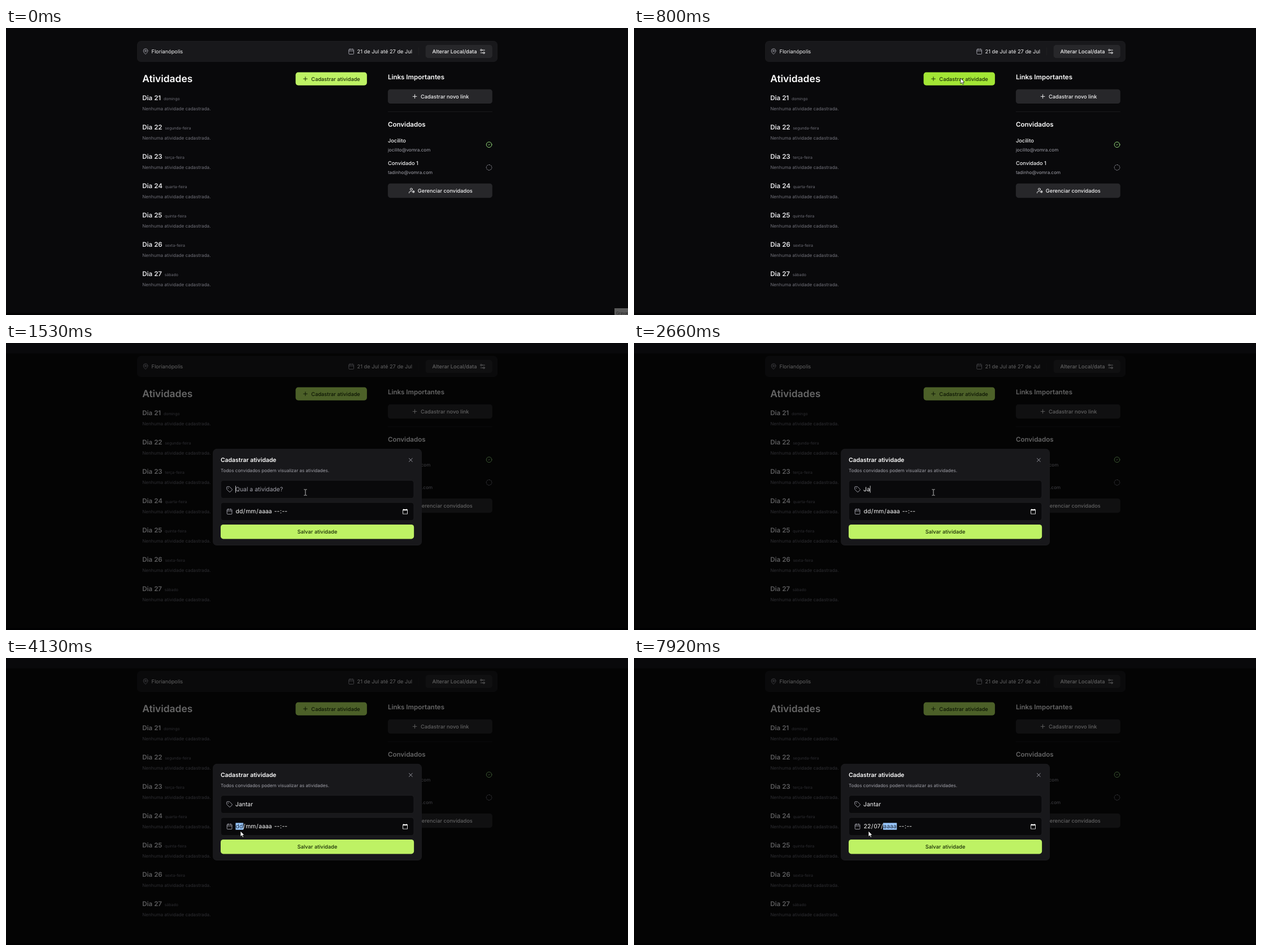
Recreate the animation shown at these times as an HTML page. Size 1101x509 px, loop 8000 ms.

```html
<!DOCTYPE html>
<html lang="pt-BR">
<head>
<meta charset="utf-8">
<title>Atividades</title>
<style>
  html, body { margin: 0; width: 100%; height: 100%; overflow: hidden; background: #09090b; }
  svg { display: block; width: 1101px; height: 509px; }
  text, .date {
    font-family: Inter, "Open Sans", sans-serif;
    font-optical-sizing: none;
    text-rendering: geometricPrecision;
    white-space: pre;
  }
  .icon { fill: none; stroke-width: 2; stroke-linecap: round; stroke-linejoin: round; }
  .date { font-size: 18px; line-height: 56px; color: #fafafa; }
  .date span { padding: 0 1px; }
  .date .on { background: #99c8ff; color: #1d2733; }
</style>
</head>
<body>
<svg viewBox="0 0 1101 509">
  <g id="ui" transform="translate(.5 0) scale(.578)"></g>
  <g id="tip">
    <rect x="1077" y="497" width="24" height="12" fill="#5a5a5a"/>
    <text x="1080" y="507.5" font-size="7" fill="#1c1c1c" style="font-family:'Open Sans',sans-serif">Gravado</text>
  </g>
  <g id="pointer">
    <path id="arrow" transform="scale(.578)" fill="#fff" stroke="#000" stroke-width="1.2"
      d="M0 0V17L4 13.3 6.8 19.5 9.6 18.2 6.9 12.2H12.2Z"/>
    <path id="beam" transform="scale(.578)" fill="none" stroke="#d8d8d8" stroke-width="1.5"
      d="M-4.5-9H-1L0-8 1-9H4.5M0-8V8M-4.5 9H-1L0 8 1 9H4.5"/>
  </g>
</svg>
<script>
const LOOP = 8000, FRAME = 1000 / 15;
const $ = id => document.getElementById(id);
const WHITE = '#fff', SOFT = '#f4f4f5', LIGHT = '#e4e4e7', GRAY = '#a1a1aa', DIM = '#71717a',
  PANEL = '#18181b', BUTTON = '#27272a', LIME = '#bef264', HOVER = '#a3e635', INK = '#1a2e05';

const icons = {
  pin: '<path d="M20 10c0 6-8 12-8 12s-8-6-8-12a8 8 0 0 1 16 0Z"/><circle cx="12" cy="10" r="3"/>',
  calendar: '<rect x="3" y="4" width="18" height="18" rx="2"/><path d="M8 2v4M16 2v4M3 10h18"/>',
  sliders: '<path d="M20 7h-9M14 17H5"/><circle cx="17" cy="17" r="3"/><circle cx="7" cy="7" r="3"/>',
  plus: '<path d="M5 12h14M12 5v14"/>',
  check: '<circle cx="12" cy="12" r="10"/><path d="m9 12 2 2 4-4"/>',
  pending: '<circle cx="12" cy="12" r="10" stroke-dasharray="4.1 3.754" stroke-dashoffset="2.05"/>',
  manage: '<circle cx="10" cy="7" r="4"/><path d="M2 21v-2a4 4 0 0 1 4-4h5M18 12v1.5M18 18.5V20M21.5 14l-1.3.8M15.8 17.2l-1.3.8M21.5 18l-1.3-.8M15.8 14.8l-1.3-.8"/><circle cx="18" cy="16" r="2.5"/>',
  tag: '<path d="M12.6 2.6A2 2 0 0 0 11.2 2H4a2 2 0 0 0-2 2v7.2a2 2 0 0 0 .6 1.4l8.7 8.7a2.4 2.4 0 0 0 3.4 0l6.6-6.6a2.4 2.4 0 0 0 0-3.4Z"/><circle cx="7.5" cy="7.5" r=".6"/>',
  close: '<path d="M18 6 6 18M6 6l12 12"/>'
};

// y is the middle of the line for text and icons
const icon = (name, x, y, color = GRAY) =>
  `<g class="icon" stroke="${color}" transform="translate(${x} ${y - 10}) scale(${20 / 24})">${icons[name]}</g>`;
const text = (s, x, y, size = 16, weight = 400, fill = SOFT, extra = '') =>
  `<text x="${x}" y="${y + size * .364}" font-size="${size}" font-weight="${weight}" fill="${fill}" ${extra}>${s}</text>`;
const box = (x, y, w, h, r, fill, extra = '') =>
  `<rect x="${x}" y="${y}" width="${w}" height="${h}" rx="${r}" fill="${fill}" ${extra}/>`;

const L = 416.5, R = 1168.5, M = 656.5;

const header = box(400.5, 40, 1104, 64, 12, PANEL) +
  box(401, 40.5, 1103, 63, 11.5, 'none', 'stroke="#fff" stroke-opacity=".035"') +
  icon('pin', L, 72) + text('Florianópolis', 444.5, 72) +
  icon('calendar', 1046.5, 72) + text('21 de Jul até 27 de Jul', 1074.5, 72) +
  box(1263, 60, 1, 24, 0, BUTTON) + box(1284, 52, 204.5, 40, 8, BUTTON) +
  text('Alterar Local/data', 1304.5, 72, 16, 500) + icon('sliders', 1448.5, 72, SOFT);

const days = ['domingo', 'segunda-feira', 'terça-feira', 'quarta-feira', 'quinta-feira', 'sexta-feira', 'sábado']
  .map((name, i) => {
    const y = 214 + 90 * i;
    const label = `<tspan dx="8" font-size="12" font-weight="400" fill="${DIM}">${name}</tspan>`;
    return text(`Dia ${21 + i}${label}`, L, y, 20, 600, LIGHT) +
      text('Nenhuma atividade cadastrada.', L, y + 34, 14, 400, DIM);
  }).join('');

const guest = (name, mail, y, mark, color) =>
  text(name, R, y, 16, 500) + text(mail, R, y + 28, 14, 400, GRAY) + icon(mark, 1468.5, y + 13, color);

const page = header +
  text('Atividades', L, 156, 30, 600, WHITE) +
  box(886, 136, 218.5, 40, 8, LIME, 'id="add"') +
  icon('plus', 906, 156, INK) + text('Cadastrar atividade', 934, 156, 16, 500, INK) + days +
  text('Links Importantes', R, 150, 20, 600, WHITE) +
  box(R, 188, 320, 44, 8, BUTTON) + icon('plus', 1241, 210, SOFT) +
  text('Cadastrar novo link', 1269, 210, 16, 500) +
  box(R, 256, 320, 1, 0, BUTTON) +
  text('Convidados', R, 295, 20, 600, WHITE) +
  guest('Jocilito', 'jocilito@vomra.com', 345, 'check', '#9be27f') +
  guest('Convidado 1', 'tadinho@vomra.com', 415, 'pending', GRAY) +
  box(R, 477, 320, 44, 8, BUTTON) + icon('manage', 1232, 499, SOFT) +
  text('Gerenciar convidados', 1260, 499, 16, 500) +
  box(-2, 874, 1910, 8, 0, '#030304');

const field = y => box(M + .5, y + .5, 591, 55, 7.5, '#09090b', `stroke="${BUTTON}"`);

const modal = `<g id="modal">` +
  box(-2, 32, 1910, 860, 0, '#000', 'fill-opacity=".6"') +
  box(632.5, 325, 640, 296, 12, PANEL) +
  box(633, 325.5, 639, 295, 11.5, 'none', 'stroke="#fff" stroke-opacity=".035"') +
  text('Cadastrar atividade', M, 359, 18, 600, WHITE) + icon('close', 1228.5, 359) +
  text('Todos convidados podem visualizar as atividades.', M, 391, 14, 400, GRAY) +
  field(421) + icon('tag', 673.5, 449) + text('', 701.5, 449, 18, 400, SOFT, 'id="name"') +
  box(701.5, 438, 1.3, 21.5, 0, '#fff', 'id="caret"') +
  field(489) + icon('calendar', 673.5, 517) +
  `<foreignObject x="701.5" y="489" width="300" height="56"><div class="date" id="date"></div></foreignObject>` +
  `<path fill="#fff" transform="translate(1212.5 508) scale(.75)" d="M20 3h-1V1h-2v2H7V1H5v2H4a2 2 0 0 0-2 2v16a2 2 0 0 0 2 2h16a2 2 0 0 0 2-2V5a2 2 0 0 0-2-2zm0 18H4V8h16z"/>` +
  box(M, 557, 592, 44, 8, LIME) +
  text('Salvar atividade', 952.5, 579, 16, 500, INK, 'text-anchor="middle"') + `</g>`;

$('ui').innerHTML = page + modal;

// pointer stops: time, x, y
const path = [
  [0, 1092, 500], [660, 578, 89], [930, 578, 89], [1200, 549, 290], [1333, 527, 263],
  [1400, 527, 263], [1533, 530, 265], [3460, 530, 265], [3867, 415, 307]
];
function pointerAt(t) {
  const i = path.findIndex(p => p[0] > t);
  if (i < 0) return path.at(-1).slice(1);
  const [a, b] = [path[i - 1], path[i]];
  const u = (t - a[0]) / (b[0] - a[0]), e = u * u * (3 - 2 * u);
  return [1, 2].map(k => a[k] + (b[k] - a[k]) * e);
}

const keys = [2320, 2660, 2750, 2830, 2920, 3060];

function dateAt(t) {
  const day = t < 6450 ? 'dd' : t < 6650 ? '02' : '22';
  const month = t < 7850 ? 'mm' : t < 7920 ? '00' : '07';
  const active = t < 3930 ? -1 : t < 6650 ? 0 : t < 7920 ? 1 : 2;
  const part = (s, i) => `<span class="${i === active ? 'on' : ''}">${s}</span>`;
  return [day, month, 'aaaa'].map(part).join('/') + ' ' + part('--', 3) + ':' + part('--', 4);
}

const show = (id, on) => $(id).style.display = on ? '' : 'none';
let shownDate = '';

function draw(t) {
  const open = t >= 870;
  show('modal', open);
  show('tip', t < 200);

  const [x, y] = pointerAt(Math.floor((t + 15) / FRAME) * FRAME);
  const inside = (l, top, r, b) => x >= l && x <= r && y >= top && y <= b;
  const typing = open && inside(406, 243, 721, 276);
  show('pointer', t >= 70);
  show('arrow', !typing);
  show('beam', typing);
  $('pointer').setAttribute('transform', `translate(${x} ${y})`);
  $('add').setAttribute('fill', !open && inside(512, 79, 638, 102) ? HOVER : LIME);

  const typed = 'Jantar'.slice(0, keys.filter(k => t >= k).length);
  const name = $('name');
  name.textContent = typed || 'Qual a atividade?';
  name.setAttribute('fill', typed ? SOFT : GRAY);
  const caretOn = t >= 1330 && t < 1860 || t >= 2320 && t < 3530;
  show('caret', caretOn);
  if (caretOn) $('caret').setAttribute('x', 701.5 + (typed ? name.getComputedTextLength() : 0));

  const date = dateAt(t);
  if (date !== shownDate) $('date').innerHTML = shownDate = date;
}

const start = performance.now();
(function tick() {
  draw((performance.now() - start) % LOOP);
  requestAnimationFrame(tick);
})();
</script>
</body>
</html>
```
